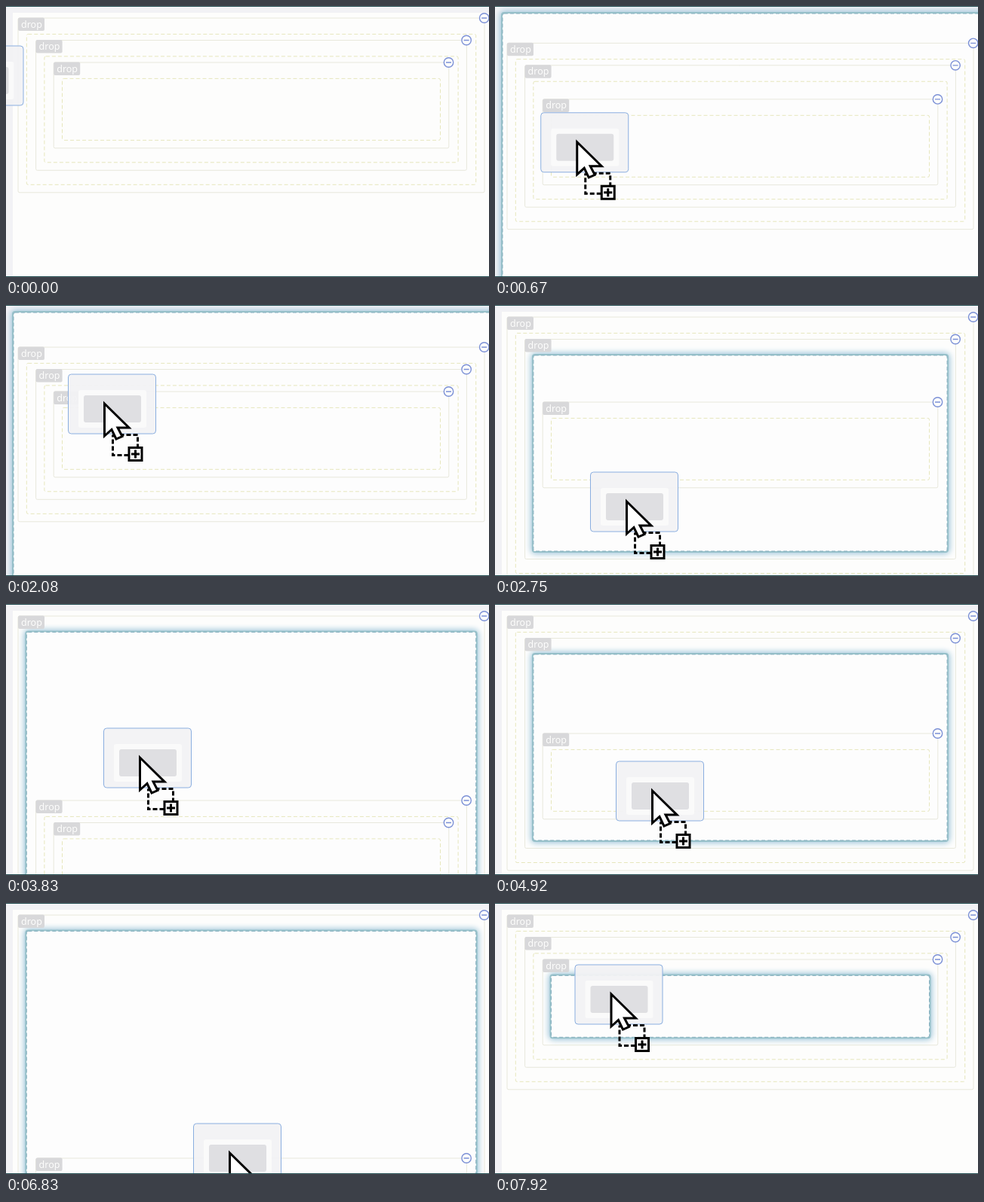
These frames come from a looping animation (640x360 px, 8 s). An HTML page with a canvas:

```html
<!DOCTYPE html>
<html lang="en">
<head>
<meta charset="utf-8">
<title>Nested drop zones</title>
<style>
  html, body { margin: 0; width: 100%; height: 100%; overflow: hidden; background: #fdfdfc; }
  canvas { display: block; width: 640px; height: 360px; }
</style>
</head>
<body>
<canvas id="stage" width="640" height="360"></canvas>
<script>
const ctx = document.getElementById('stage').getContext('2d');
const STEPS = 96, STEP_MS = 1000 / 12;
const OUTSIDE = -1, ROOT = 0, OUTER = 1, MIDDLE = 2, INNER = 3;

const color = {
  page: '#fdfdfc', edge: '#f2f2f5', frame: '#244e52',
  border: '#e8e8dc', dashed: '#e6e6bc', label: '#d8d8da',
  active: '#fdfdfd', activeLine: '#98c2ca', activeDash: '#85aebf', glow: '#84b6d2',
  button: '#7b90d6', card: 'rgba(243,243,245,.95)', cardLine: '#8aaee0', cardPad: '#fafafa', cardFill: '#dfdfe2'
};

// The pointer's stops: step, position, zone under it, room opened above that zone's child
const stops = [
  [0, -45.5, 91, OUTSIDE, 0],
  [6, 80, 165, ROOT, 45],
  [12, 189, 222, MIDDLE, 60],
  [19, 239, 272, OUTER, 188],
  [25, 130, 130, ROOT, 40],
  [33, 174, 260, MIDDLE, 54],
  [38, 188, 280, OUTER, 80],
  [42, 172, 125, ROOT, 25],
  [46, 177, 203, OUTER, 215.5],
  [59, 208, 247, MIDDLE, 97],
  [73, 190, 52, OUTER, 190],
  [82, 296, 331, OUTER, 293.5],
  [90, 200, 190, OUTER, 130],
  [95, 153.5, 120, INNER, 0]
];

// Between two stops the pointer eases across, one zone closes and the next one opens
function stateAt(step) {
  const next = Math.max(1, stops.findIndex(stop => stop[0] >= step));
  const [t0, x0, y0, from, gap0] = stops[next - 1];
  const [t1, x1, y1, to, gap1] = stops[next];
  const u = (step - t0) / (t1 - t0), e = u * u * (3 - 2 * u);
  const share = level => (from === level) * (1 - e) + (to === level) * e;
  return {
    x: x0 + (x1 - x0) * e,
    y: y0 + (y1 - y0) * e,
    hover: u < 0.5 ? from : to,
    share,
    gap: level => (from === level) * gap0 * (1 - e) + (to === level) * gap1 * e
  };
}

// Tops follow from the gaps above; bottoms wrap the child from the inside out
function arrange({ y, gap, share }) {
  const drops = {};
  let top = 16 + gap(ROOT);
  for (let level = OUTER; level <= INNER; level++) {
    drops[level] = { top };
    top += 29.5 + gap(level);
  }
  let zoneBottom = drops[INNER].top + 103.3;
  for (let level = INNER; level >= OUTER; level--) {
    // The middle zone stretches to keep the dragged card inside
    if (level === MIDDLE) zoneBottom += share(MIDDLE) * Math.max(0, y + 67 - zoneBottom);
    const bottom = zoneBottom + 10.5;
    Object.assign(drops[level], { zoneBottom, bottom });
    zoneBottom = bottom + 19;
  }
  return drops;
}

function box(x, y, w, h, radius, fill, stroke, width = 1, dash = []) {
  ctx.beginPath();
  ctx.roundRect(x, y, w, h, radius);
  if (fill) { ctx.fillStyle = fill; ctx.fill(); }
  if (stroke) {
    ctx.strokeStyle = stroke;
    ctx.lineWidth = width;
    ctx.setLineDash(dash);
    ctx.stroke();
    ctx.setLineDash([]);
  }
}

function zone(left, top, right, bottom, active) {
  const w = right - left, h = bottom - top;
  if (!active) {
    box(left, top, w, h, 2, null, color.dashed, 1, [5, 3]);
    return;
  }
  ctx.save();
  ctx.shadowColor = color.glow;
  ctx.shadowBlur = 9;
  box(left - 1, top - 1, w + 2, h + 2, 3, color.active, color.activeLine, 2);
  ctx.restore();
  box(left, top, w, h, 2, color.active, color.activeDash, 1, [5, 3]);
}

function minusButton(x, y) {
  ctx.beginPath();
  ctx.arc(x, y, 6.2, 0, 2 * Math.PI);
  ctx.fillStyle = color.page;
  ctx.fill();
  ctx.moveTo(x - 3.5, y);
  ctx.lineTo(x + 3.5, y);
  ctx.strokeStyle = color.button;
  ctx.lineWidth = 1.4;
  ctx.stroke();
}

function drop(level, drops, hover) {
  const inset = 23.6 * (level - 1), left = 16 + inset, right = 634 - inset;
  const { top, bottom, zoneBottom } = drops[level];
  box(left, top, right - left, bottom - top, 2, null, color.border);
  zone(left + 11.3, top + 21.4, right - 11.3, zoneBottom, hover === level);
  box(left, top - 0.5, 35, 17.5, 2, color.label);
  ctx.fillStyle = color.page;
  ctx.font = '12.5px "Noto Sans", "Open Sans", sans-serif';
  ctx.fillText('drop', left + 4, top + 12.5);
  if (level < INNER) drop(level + 1, drops, hover);
  minusButton(right - 0.3, top);
}

function draggedCard({ x, y, hover }) {
  ctx.save();
  ctx.translate(x, y);
  box(-47.5, -38, 116, 79, 4, color.card, color.cardLine);
  box(-34, -17, 90, 50, 3, color.cardPad);
  box(-27, -10, 76, 36, 3, color.cardFill);
  if (hover !== OUTSIDE) {
    box(11.5, 42.5, 33, 27, 0, null, '#000', 3, [6, 3]);
    box(33, 59.5, 17, 17, 0, '#fff', '#000', 3);
    ctx.stroke(new Path2D('M36 68H47M41.5 62.5V73.5'));
    const arrow = new Path2D('M0.5 1V44L10 35.5L16 48L24 44.5L18 33H33Z');
    ctx.fillStyle = '#fff';
    ctx.fill(arrow);
    ctx.stroke(arrow);
  }
  ctx.restore();
}

function draw(step) {
  const state = stateAt(step), drops = arrange(state);

  ctx.fillStyle = color.page;
  ctx.fillRect(0, 0, 640, 360);
  ctx.fillStyle = color.edge;
  ctx.fillRect(0, 0, 640, 9);
  ctx.fillRect(0, 0, 9, 360);
  if (state.hover === ROOT) zone(10, 10, 660, 400, true);

  drop(OUTER, drops, state.hover);
  draggedCard(state);

  ctx.fillStyle = color.frame;
  ctx.fillRect(0, 0, 640, 1);
  ctx.fillRect(0, 359, 640, 1);
}

function tick() {
  // The small offset absorbs rounding of step times
  draw(Math.floor((performance.now() % 8000 + 4) / STEP_MS) % STEPS);
  requestAnimationFrame(tick);
}
tick();
</script>
</body>
</html>
```
